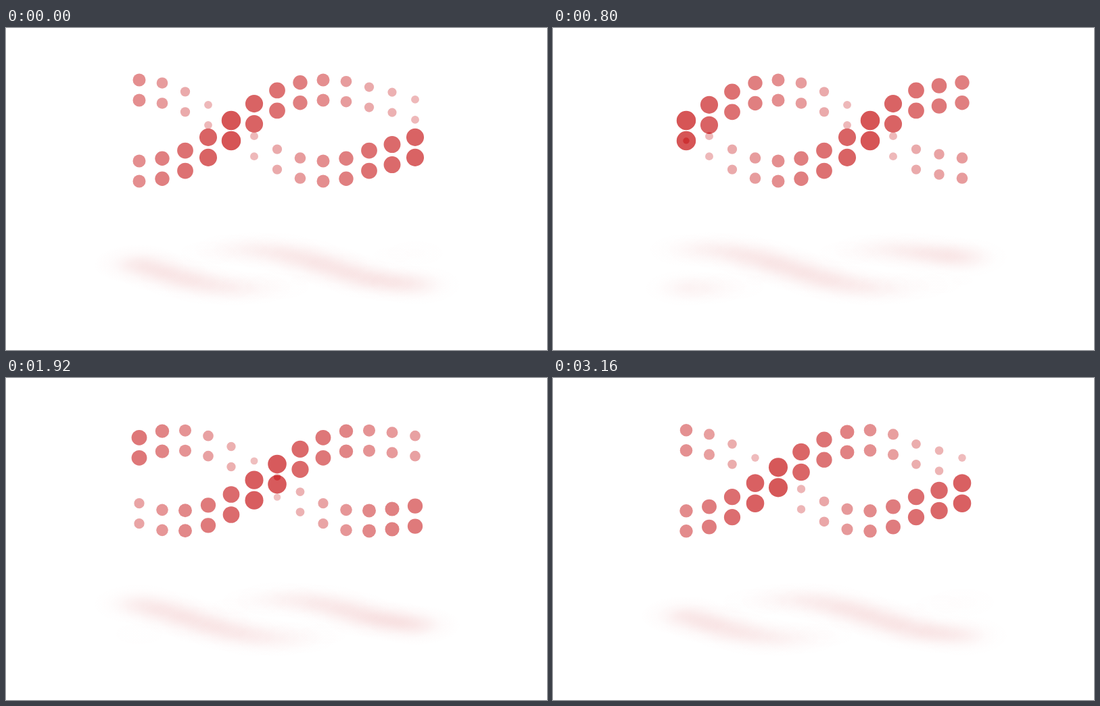
Animation of 800x477 px, one loop 3.2 s. Source, as an HTML page with a canvas:

```html
<!DOCTYPE html>
<html>
<head>
<meta charset="utf-8">
<style>
html, body { margin: 0; width: 100%; height: 100%; overflow: hidden; background: #fff; }
canvas { display: block; }
</style>
</head>
<body>
<canvas width="800" height="477"></canvas>
<script>
const ctx = document.querySelector('canvas').getContext('2d');
const LOOP = 3200, STEP = 40, COLS = 13, GAP = 30;
const RED = [200, 28, 30];
const EASE = [.37, .42, .57];

// Symmetric cubic-bezier(h, 0, 1 - h, 1)
function ease(h, x) {
  let lo = 0, hi = 1;
  for (let i = 0; i < 20; i++) {
    const s = (lo + hi) / 2, q = 1 - s;
    if (3 * q * q * s * h + 3 * q * s * s * (1 - h) + s ** 3 < x) lo = s;
    else hi = s;
  }
  return lo * lo * (3 - 2 * lo);
}

// Eight columns make half a turn; even halves run behind, odd ones in front.
function makeDot(col, strand, t) {
  const j = Math.min(col, 10) + Math.max(0, col - 10) / 2 + 8 * strand - t / 200;
  const n = Math.floor(j / 8), f = j / 8 - n;
  const side = n % 2 ? 1 : -1;
  const depth = side * (1 - Math.abs(2 * f - 1));
  const h = EASE[Math.max(0, Math.min(2, n))];
  return {
    x: 197 + 34 * col,
    y: 137 + 60 * side * (1 - 2 * ease(h, f)),
    r: 9.5 * (1 + depth / 2),
    alpha: .5 + depth / 4,
    front: side > 0,
    angle: (j - .6) * Math.PI / 8
  };
}

function disc(x, y, r, fill) {
  ctx.beginPath();
  ctx.arc(x, y, r, 0, 7);
  ctx.fillStyle = fill;
  ctx.fill();
}

function drawDot(d) {
  const fill = `rgb(${RED.map(c => 255 - d.alpha * (255 - c))})`;
  disc(d.x, d.y, d.r, fill);
  disc(d.x, d.y + GAP, d.r, fill);
}

function drawShadow(d) {
  const a = .08 * ((1 - Math.cos(d.angle)) / 2) ** 1.5;
  const g = ctx.createRadialGradient(0, 0, 0, 0, 0, 3);
  for (let i = 0; i <= 12; i++) {
    const v = i < 12 ? a * Math.exp(-((i / 4) ** 2) / 2) : 0;
    g.addColorStop(i / 12, `rgba(${RED},${v.toFixed(5)})`);
  }
  ctx.save();
  ctx.translate(d.x, 357 - 29 * Math.sin(d.angle));
  ctx.scale(25, 11);
  disc(0, 0, 3, g);
  ctx.restore();
}

// Tint the part of the rear dots seen through the lower front dot
function drawOverlap(front, back, dark) {
  ctx.save();
  ctx.beginPath();
  ctx.arc(front.x, front.y + GAP, front.r, 0, 7);
  ctx.clip();
  const tint = dark ? `rgba(${RED},.6)` : 'rgba(255,255,255,.14)';
  disc(back.x, back.y, back.r, tint);
  if (dark) disc(back.x, back.y + GAP, back.r, tint);
  ctx.restore();
}

function draw(t) {
  ctx.fillStyle = '#fff';
  ctx.fillRect(0, 0, 800, 477);
  for (let col = 0; col < COLS; col++) {
    const a = makeDot(col, 0, t), b = makeDot(col, 1, t);
    const [front, back] = a.front ? [a, b] : [b, a];
    drawShadow(a);
    drawShadow(b);
    drawDot(back);
    drawDot(front);
    drawOverlap(front, back, a.front);
  }
}

const start = performance.now();
function tick() {
  const t = (performance.now() - start) % LOOP;
  draw(Math.floor(t / STEP) * STEP);
  requestAnimationFrame(tick);
}
tick();
</script>
</body>
</html>
```
